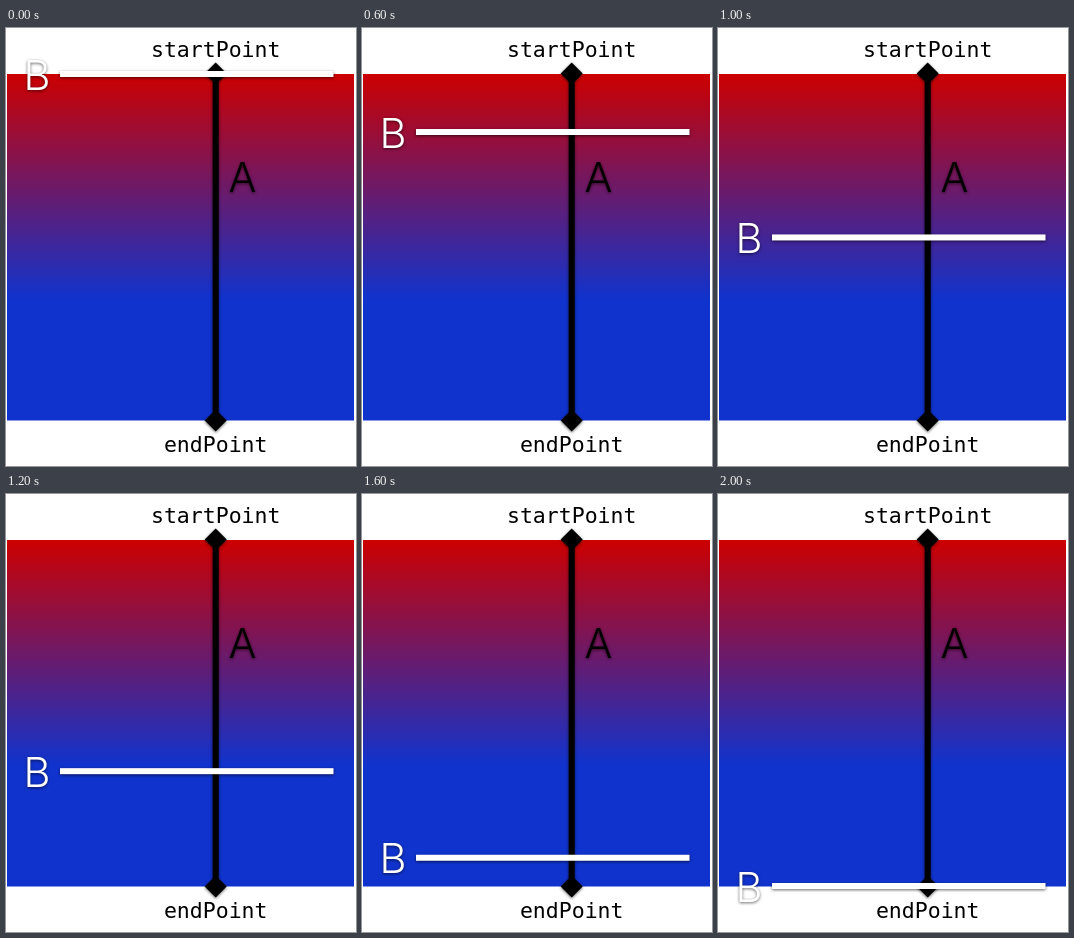
An HTML page that plays this animation: 350x438 px, repeating every 2100 ms.

```html
<!DOCTYPE html>
<html lang="en">
<head>
<meta charset="utf-8">
<style>
  html, body { margin: 0; width: 100%; height: 100%; overflow: hidden; background: #fff; }
  svg { display: block; }
  text { text-anchor: middle; }
  .name { font: 21.5px "DejaVu Sans Mono", monospace; }
  .letter { font: 300 41.5px Inter, sans-serif; }
  .raised { filter: drop-shadow(0 1px 1.5px rgba(0, 0, 0, .6)); }
</style>
</head>
<body>
<svg width="350" height="438" viewBox="0 0 350 438">
  <defs>
    <linearGradient id="fade" x1="0" y1="0" x2="0" y2="1">
      <stop offset="0" stop-color="#cc0000"/>
      <stop offset=".65" stop-color="#1033cd"/>
    </linearGradient>
    <path id="knob" d="M0-11 11 0 0 11-11 0Z"/>
  </defs>
  <rect x="1" y="46" width="347" height="346.5" fill="url(#fade)"/>
  <text class="name" x="209.7" y="28.5">startPoint</text>
  <text class="name" x="209.7" y="423.5">endPoint</text>
  <g class="raised">
    <path d="M209.7 46V392" stroke="#000" stroke-width="6"/>
    <use href="#knob" x="209.7" y="45.5"/>
    <use href="#knob" x="209.7" y="392.5"/>
    <text class="letter" x="236.5" y="163.5">A</text>
  </g>
  <g id="marker" class="raised" fill="#fff">
    <rect x="54" y="-3" width="273.5" height="6"/>
    <text class="letter" x="31" y="15.7">B</text>
  </g>
</svg>
<script>
  const LOOP = 2100, STEP = 100, TRAVEL = 2000, TOP = 46, BOTTOM = 392;
  const marker = document.getElementById('marker');
  const clamp = v => Math.min(1, Math.max(0, v));

  // cubic-bezier(.42, 0, .58, 1), solved by bisection
  function easeInOut(x) {
    let lo = 0, hi = 1;
    for (let i = 0; i < 24; i++) {
      const s = (lo + hi) / 2, r = 1 - s;
      if (1.26 * s * r * r + 1.74 * s * s * r + s ** 3 < x) lo = s;
      else hi = s;
    }
    return lo * lo * (3 - 2 * lo);
  }

  function draw(now) {
    const t = Math.floor((now % LOOP) / STEP) * STEP;
    // the marker trails slightly, then catches up past the middle
    const lag = 32 * clamp((1200 - t) / 200);
    const y = TOP + (BOTTOM - TOP) * easeInOut(clamp((t - lag) / TRAVEL));
    marker.setAttribute('transform', `translate(0 ${y.toFixed(2)})`);
  }

  const start = performance.now();
  function tick() {
    draw(performance.now() - start);
    requestAnimationFrame(tick);
  }
  tick();
</script>
</body>
</html>
```
